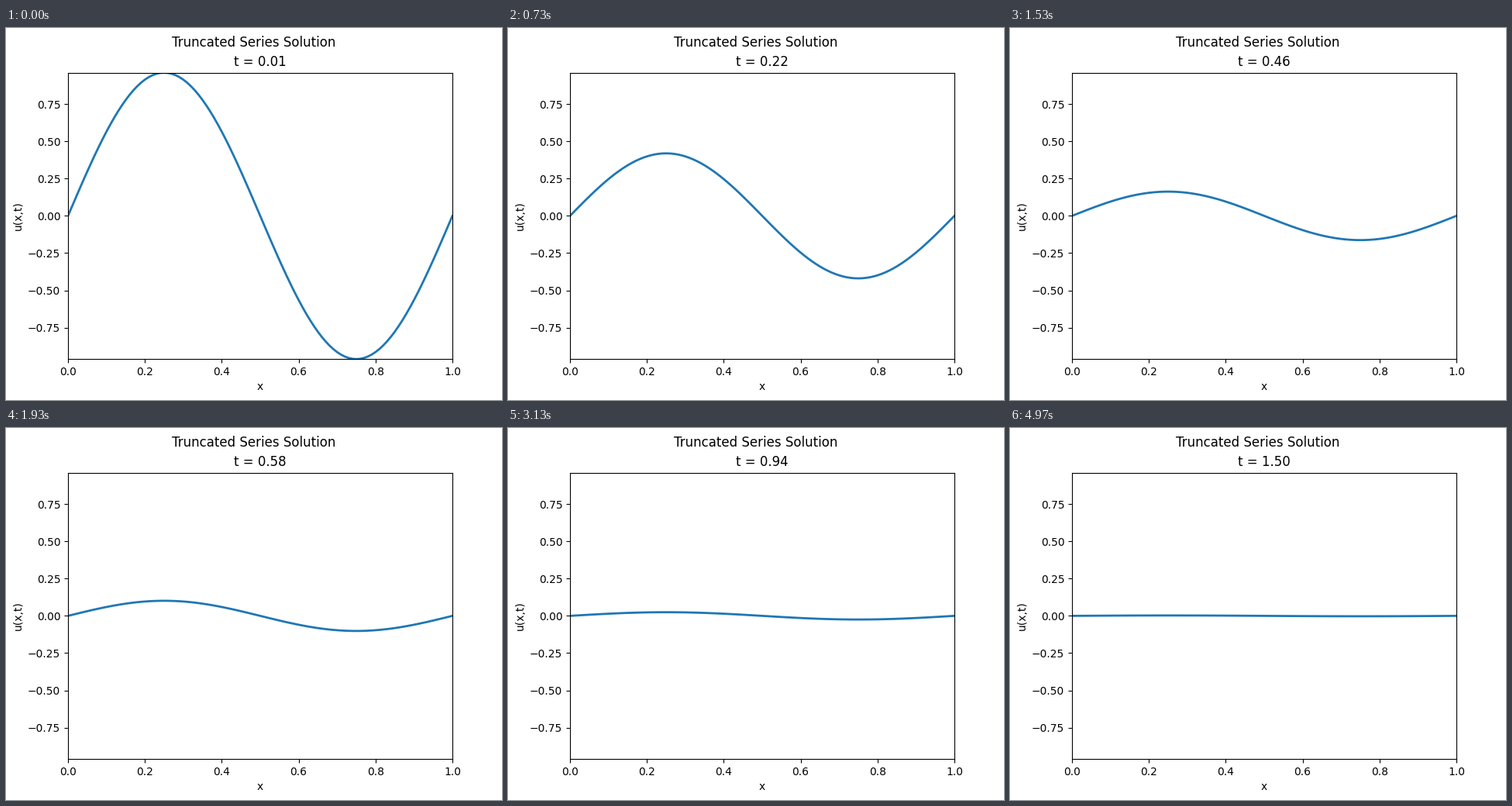
Recreate the animation shown at these times as a matplotlib script. Size 640 by 480 pixels, loop 5000 ms.

```python
import numpy as np
import matplotlib.pyplot as plt
from matplotlib.animation import FuncAnimation

FRAMES = 150
LOOP_MS = 5000
DT = 0.01
ALPHA = 0.1  # diffusivity

x = np.linspace(0, 1, 101)


def u(t):
    """Heat equation solution for the initial state sin(2 pi x)."""
    return np.exp(-ALPHA * (2 * np.pi) ** 2 * t) * np.sin(2 * np.pi * x)


fig, ax = plt.subplots(figsize=(6.4, 4.8), dpi=100)
fig.suptitle("Truncated Series Solution")
line, = ax.plot(x, u(DT), lw=2)
title = ax.set_title("")
peak = u(DT).max()
ax.set(xlim=(0, 1), ylim=(-peak, peak), xlabel="x", ylabel="u(x,t)")


def update(frame):
    t = (frame + 1) * DT
    line.set_ydata(u(t))
    title.set_text(f"t = {t:.2f}")
    return line, title


anim = FuncAnimation(fig, update, frames=FRAMES, interval=LOOP_MS / FRAMES,
                     repeat=True, repeat_delay=0, blit=False)
plt.show()
```
